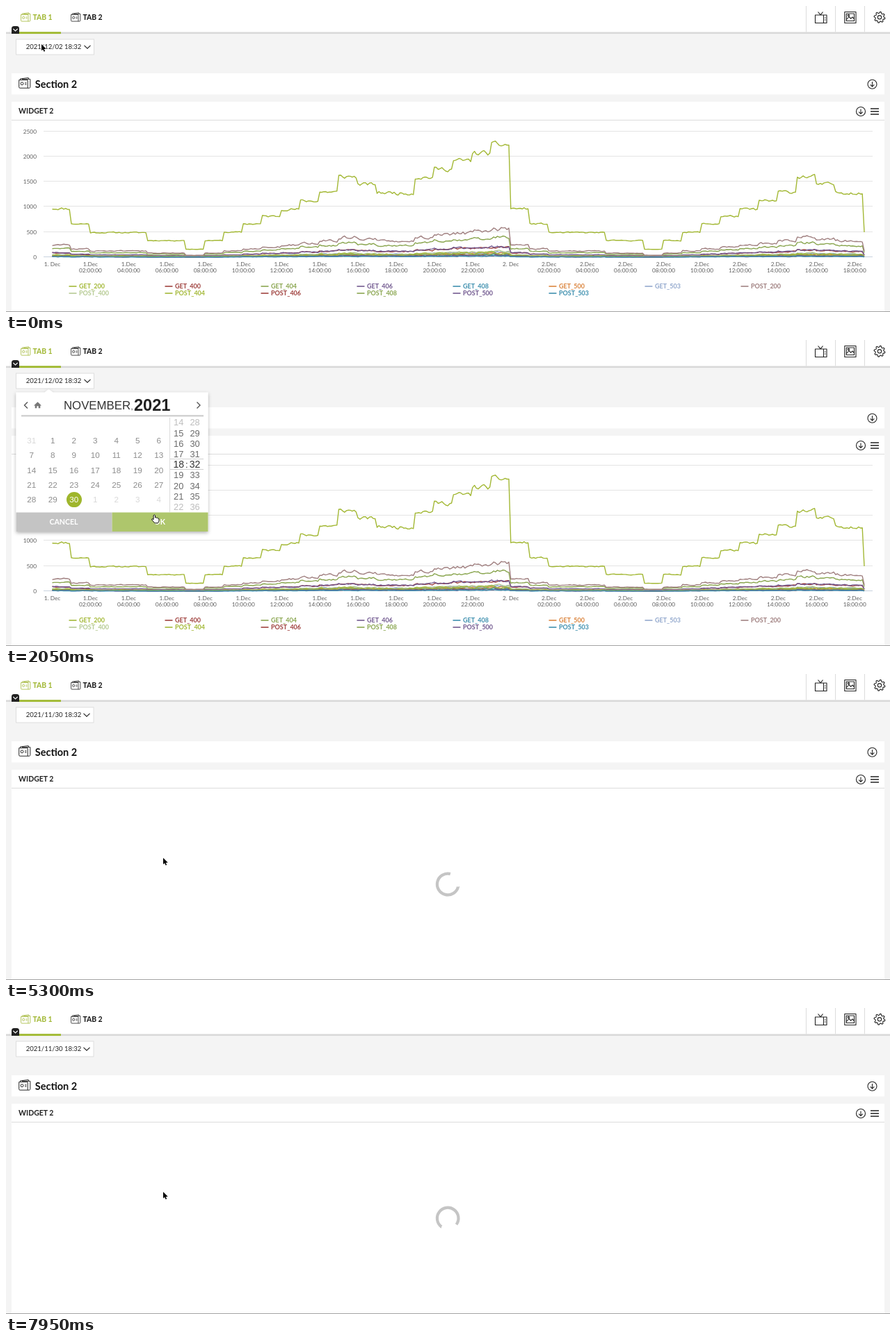
Recreate the animation shown at these times as an HTML page. Size 1271x441 px, loop 8000 ms.

```html
<!DOCTYPE html>
<html lang="en">
<head>
<meta charset="utf-8">
<title>Dashboard date picker</title>
<style>
  html, body { margin: 0; width: 100%; height: 100%; overflow: hidden; background: #f4f4f4; }
  svg { display: block; width: 100%; height: 100%; }
  text { font-family: Lato, "Open Sans", sans-serif; }
  .b { font-weight: 700; }
  .axis { font-size: 8.3px; fill: #606060; }
  .legend { font-size: 9px; font-weight: 700; }
  .line { fill: none; stroke: #222; stroke-width: 1.1; }
  #picker text { font-family: "Liberation Sans", Arial, sans-serif; text-anchor: middle; }
  #picker .btn { font: 700 10.6px Lato, sans-serif; fill: #fff; }
</style>
</head>
<body>
<svg viewBox="0 0 1271 441" preserveAspectRatio="none">
  <defs>
    <symbol id="news" viewBox="0 0 18 18" overflow="visible">
      <g fill="none" stroke="currentColor" stroke-linejoin="round">
        <path d="M.7 4.3H13.6V16.2H2.2Q.7 16.2.7 14.7ZM2.6 4.2V2.5L14.6 1 15 2.6M13.6 16.2H16Q17.3 16 17.3 14.5V3H5"/>
        <circle cx="5.2" cy="9.6" r="2"/>
        <path d="M9.3 8.6h2.5M9.3 10.8h2.5"/>
      </g>
    </symbol>
    <symbol id="down" overflow="visible">
      <g class="line"><circle r="6.5"/><path d="M0-3.6V3.3M-2.8.7 0 3.5 2.8.7"/></g>
    </symbol>
    <filter id="shade" x="-10%" y="-10%" width="120%" height="125%">
      <feDropShadow dx="0" dy="2" stdDeviation="2.6" flood-color="#000" flood-opacity=".3"/>
    </filter>
  </defs>

  <rect width="1271" height="441" fill="#f4f4f4"/>
  <rect width="1271" height="38" fill="#fff"/>
  <rect y="37.5" width="1271" height="2.6" fill="#d9d9d9"/>
  <rect x="13" y="37.3" width="66" height="2.8" fill="#9fb92c"/>
  <path d="M8 40V32.5Q8 29 11.5 29H15.5Q19 29 19 32.5V40Z" fill="#222"/>
  <path d="M10.3 32.8 13.5 36 16.7 32.8" fill="none" stroke="#fff" stroke-width="1.2"/>

  <use href="#news" x="21" y="9" width="14.5" height="14.5" color="#a3b93a"/>
  <text class="b" x="38.5" y="20.3" font-size="10.4" fill="#9fb62f">TAB 1</text>
  <use href="#news" x="93" y="9" width="14.5" height="14.5" color="#222"/>
  <text class="b" x="110.5" y="20.3" font-size="10.4" fill="#111">TAB 2</text>

  <path d="M1150.5 0V37.5M1192.5 0V37.5M1234.5 0V37.5" stroke="#dcdcdc"/>
  <g class="line" stroke-linejoin="round">
    <path d="M1163.5 13H1180V24.5H1163.5ZM1167.5 8.5 1171.2 12.8 1174.5 8.5M1175.5 13V24.500M1177 17h1.500M1177 20h1.500"/>
    <path d="M1205.800 8.500H1222V24.500H1205.800ZM1208.300 11H1219.500V21.500H1208.300ZM1208.500 19.500 1212 15.500 1214.700 18.200 1217 16 1219.500 18.500"/>
    <circle cx="1211.5" cy="13.5" r="1.1"/>
    <path id="gear"/>
    <circle cx="1256" cy="16.3" r="2.7"/>
  </g>

  <rect id="field" x="14.5" y="48" width="112" height="22" fill="#fff" stroke="#dedede"/>
  <text id="date" x="28.8" y="62.2" font-size="9.5" fill="#222"></text>
  <path id="chevron" class="line" d="M112.5 56.8 117 61.2 121.5 56.8"/>

  <rect x="8" y="97" width="1255" height="30.5" fill="#fff"/>
  <use href="#news" x="18" y="102.5" width="17.5" height="17.5" color="#222"/>
  <text class="b" x="41.8" y="117.7" font-size="14.5" fill="#111">Section 2</text>
  <use href="#down" x="1245.5" y="112.7"/>

  <rect x="8" y="138" width="1255" height="303" fill="#fff"/>
  <path d="M8 164.5H1263" stroke="#dcdcdc"/>
  <text class="b" x="18" y="155" font-size="10.5" fill="#222">WIDGET 2</text>
  <use href="#down" x="1229" y="152"/>
  <path d="M1243 148h12M1243 152h12M1243 156h12" stroke="#222" stroke-width="1.6"/>

  <g id="chart"></g>
  <circle id="spinner" cx="635.2" cy="303" r="15.3" fill="none" stroke="#c5c5c5" stroke-width="4.2"
    pathLength="360" stroke-dasharray="270 90"/>
  <path d="M0 440.5H1271" stroke="#a2a2a2"/>
  <g id="picker"></g>

  <path id="arrow" d="M0 0V9.3L2.1 7.4 3.6 10.7 5.2 10 3.7 6.9 6.7 6.7Z" fill="#000" stroke="#fff" stroke-width=".7" paint-order="stroke"/>
  <path id="hand" d="M-1.2 1Q0-.8 1.2 1V4.2Q2.6 3.6 3.3 4.6 4.6 4 5.2 5.2 6.6 4.9 6.6 6.4V9Q6.3 11.6 4.8 12H.8Q-1.2 10.5-3.6 7.2-4 5.8-2.6 5.9L-1.2 7Z" fill="#fff" stroke="#111"/>
</svg>
<script>
const $ = id => document.getElementById(id);
const show = (id, on) => $(id).setAttribute('display', on ? 'inline' : 'none');
const text = (s, x, y, attrs = '') => `<text x="${x}" y="${y}" ${attrs}>${s}</text>`;

let seed = 11;
function random() {
  seed = (seed * 1664525 + 1013904223) % 4294967296;
  return seed / 4294967296;
}

function gearPath() {
  let d = '';
  for (let i = 0; i < 32; i++) {
    const a = (i - 1.5) * Math.PI / 16, r = i % 4 < 2 ? 6 : 7.9;
    d += (i ? 'L' : 'M') + (1256 + r * Math.sin(a)).toFixed(1) + ' ' + (16.3 - r * Math.cos(a)).toFixed(1);
  }
  return d + 'Z';
}

// Chart: hourly load profile, every series is a noisy share of it
const hourly = [70, 48, 35.5, 35.5, 35.5, 24, 24, 11.5, 24, 36, 48, 59,
  69, 81, 94, 116, 105, 93, 92, 115, 127, 139, 150, 162];
const hourX = h => 66.5 + h * 27.47;
const olive = '#a3b835', red = '#9f403d', green = '#89a54e', purple = '#71588f', teal = '#3d8fae';
const series = [
  ['GET_200', olive, 1, .027], ['GET_400', red, .088, .12], ['GET_404', green, .18, .08],
  ['GET_406', purple, .092, .12], ['GET_408', teal, .02, .4], ['GET_500', '#db843d', .035, .2],
  ['GET_503', '#92a8cd', .045, .2], ['POST_200', '#a08080', .25, .08], ['POST_400', '#b5ca92', .05, .2],
  ['POST_404', olive, .04, .3], ['POST_406', red, .018, .5], ['POST_408', green, .03, .3],
  ['POST_500', purple, .014, .5], ['POST_503', teal, .01, .4]
];

function seriesPath(share, amp) {
  let d = '', last = 0;
  for (let i = 0; i < 425; i++) {
    const h = i / 10;
    last = last * .45 + (random() * 2 - 1) * .8;
    const y = 362 - hourly[Math.floor(h) % 24] * share * (1 + amp * last);
    d += (i ? 'L' : 'M') + hourX(h).toFixed(1) + ' ' + y.toFixed(1);
  }
  return d + `L${hourX(42.5).toFixed(1)} ${(362 - 36 * share).toFixed(1)}`;
}

function drawChart() {
  let out = '';
  for (let v = 0; v <= 2500; v += 500) {
    const y = Math.round(362 - v * .07252) - .5;
    out += `<path d="M54 ${y}H1246" stroke="${v ? '#e4e4e4' : '#c8d2de'}"/>`;
    out += text(v, 44, y + 3.4, 'class="axis" text-anchor="end"');
  }
  for (let h = 0; h <= 42; h += 2) {
    const x = hourX(h).toFixed(1), hour = h % 24, mid = 'class="axis" text-anchor="middle"';
    const day = h < 24 ? 1 : 2;
    out += text(day + (hour ? '.Dec' : '. Dec'), x, 375, mid);
    if (hour) out += text(String(hour).padStart(2, '0') + ':00:00', x, 384, mid);
  }
  series.forEach(([name, color, share, amp], i) => {
    const x = 90.5 + i % 8 * 138, y = i < 8 ? 404 : 414;
    out += `<path d="${seriesPath(share, amp)}" fill="none" stroke="${color}" stroke-width="1.4" stroke-linejoin="round"/>`;
    out += `<path d="M${x} ${y}h11" stroke="${color}" stroke-width="1.6"/>`;
    out += text(name, x + 14.5, y + 3.2, `class="legend" fill="${color}"`);
  });
  return out;
}

// One month page: first is the day number of the top-left cell
function monthPage(id, name, first, days, daysBefore, chosen, limit) {
  let out = `<g id="${id}">` + text(name, 179, 100, 'font-size="16.8" fill="#333" style="text-anchor:end"');
  for (let i = 0; i < 35; i++) {
    const n = first + i, x = 36.7 + i % 7 * 30.5, y = 144.5 + Math.floor(i / 7) * 21.4;
    const day = n < 1 ? n + daysBefore : n > days ? n - days : n;
    const open = n >= 1 && n <= limit;
    if (n === chosen) out += `<circle cx="${x + .3}" cy="${y}" r="11" fill="#9fb62c"/>`;
    out += text(day, x, y + 4.2, `font-size="11.7" fill="${n === chosen ? '#fff' : open ? '#8c8c8c' : '#d8d8d8'}"`);
  }
  return out + '</g>';
}

function drawPicker() {
  let out = `<path d="M14.5 75.5H55.5L61.5 71 67.5 75.5H290.5V276H14.5Z" fill="#fff" filter="url(#shade)"/>
    <path d="M31 89.5 26.5 94 31 98.5M274.5 89.5 279 94 274.5 98.5" fill="none" stroke="#555" stroke-width="1.4"/>
    <path d="M40 94.5 45.5 89.3 51 94.5H49.3V98.3H46.7V95.3H44.3V98.3H41.7V94.5Z" fill="#777"/>
    <path d="M22 109.3H284" stroke="#d2d2d2" stroke-width="2.6"/>
    <path d="M235.5 112V248" stroke="#dcdcdc"/>
    <path d="M236 171.5H284M236 186.5H284" stroke="#cfcfcf"/>
    <circle id="hover" cx="97.7" cy="144.5" r="10.5" fill="#f5f7e6"/>`;
  out += text(',', 181, 100, 'font-size="11" fill="#333"');
  out += text('2021', 210.2, 102.4, 'font-size="23.6" font-weight="700" fill="#222"');
  out += monthPage('december', 'DECEMBER', -2, 31, 30, 2, 2);
  out += monthPage('november', 'NOVEMBER', 0, 30, 31, 30, 30);
  for (let i = -4; i <= 4; i++) {
    const y = 179.5 + i * 15.2 + 4.6, far = Math.abs(i);
    const look = `font-size="${far ? 12.8 : 14}" fill="${far > 3 ? '#bdbdbd' : far ? '#6a6a6a' : '#333'}"`;
    out += text(18 + i, 248.2, y, look) + text(32 + i, 271.5, y, look);
  }
  out += text(':', 259.8, 183.5, 'font-size="13" fill="#333"');
  out += '<rect x="14.5" y="248.5" width="138" height="27.5" fill="#c4c4c4"/>';
  out += '<rect x="152.5" y="248.5" width="138" height="27.5" fill="#aec66c"/>';
  return out + text('CANCEL', 83, 265.6, 'class="btn"') + text('OK', 221, 265.6, 'class="btn"');
}

$('gear').setAttribute('d', gearPath());
$('chart').innerHTML = drawChart();
$('picker').innerHTML = drawPicker();

const LOOP = 8000, STEP = 50, OPEN = 550, PICK = 1450, LOAD = 2800;
const path = [[0, 51, 55], [300, 57, 61], [700, 57, 61], [1300, 103.5, 138],
  [1650, 103.5, 138], [2150, 226, 265], [LOOP, 226, 265]];

function pointer(t) {
  const i = path.findIndex(p => p[0] > t);
  const [t0, x0, y0] = path[i - 1], [t1, x1, y1] = path[i];
  const u = (t - t0) / (t1 - t0), k = u * u * (3 - 2 * u);
  return [x0 + (x1 - x0) * k, y0 + (y1 - y0) * k];
}

function render(t) {
  const loading = t >= LOAD, picked = t >= PICK;
  show('chart', !loading);
  show('spinner', loading);
  show('picker', t >= OPEN && !loading);
  $('picker').setAttribute('opacity', Math.min(1, Math.max(0, (t - OPEN + STEP) / 200)));
  show('december', !picked);
  show('november', picked);
  show('hover', t >= 1200 && t < 1750);

  $('date').textContent = loading ? '2021/11/30 18:32' : '2021/12/02 18:32';
  $('field').setAttribute('width', loading ? 111.5 : 112);
  $('chevron').setAttribute('transform', `translate(${loading ? -1 : 0} 0)`);
  const turn = -31 + (t - LOAD) / STEP * 22.5;
  $('spinner').setAttribute('transform', `rotate(${turn} 635.2 303)`);

  const [x, y] = pointer(t), hand = t >= 1100 && t < 2450;
  show('hand', hand);
  show('arrow', !hand);
  $(hand ? 'hand' : 'arrow').setAttribute('transform', `translate(${x.toFixed(1)} ${y.toFixed(1)})`);
}

const start = performance.now();
function tick() {
  const t = Math.max(0, performance.now() - start) % LOOP;
  render(Math.floor(t / STEP) * STEP);
  requestAnimationFrame(tick);
}
tick();
</script>
</body>
</html>
```
